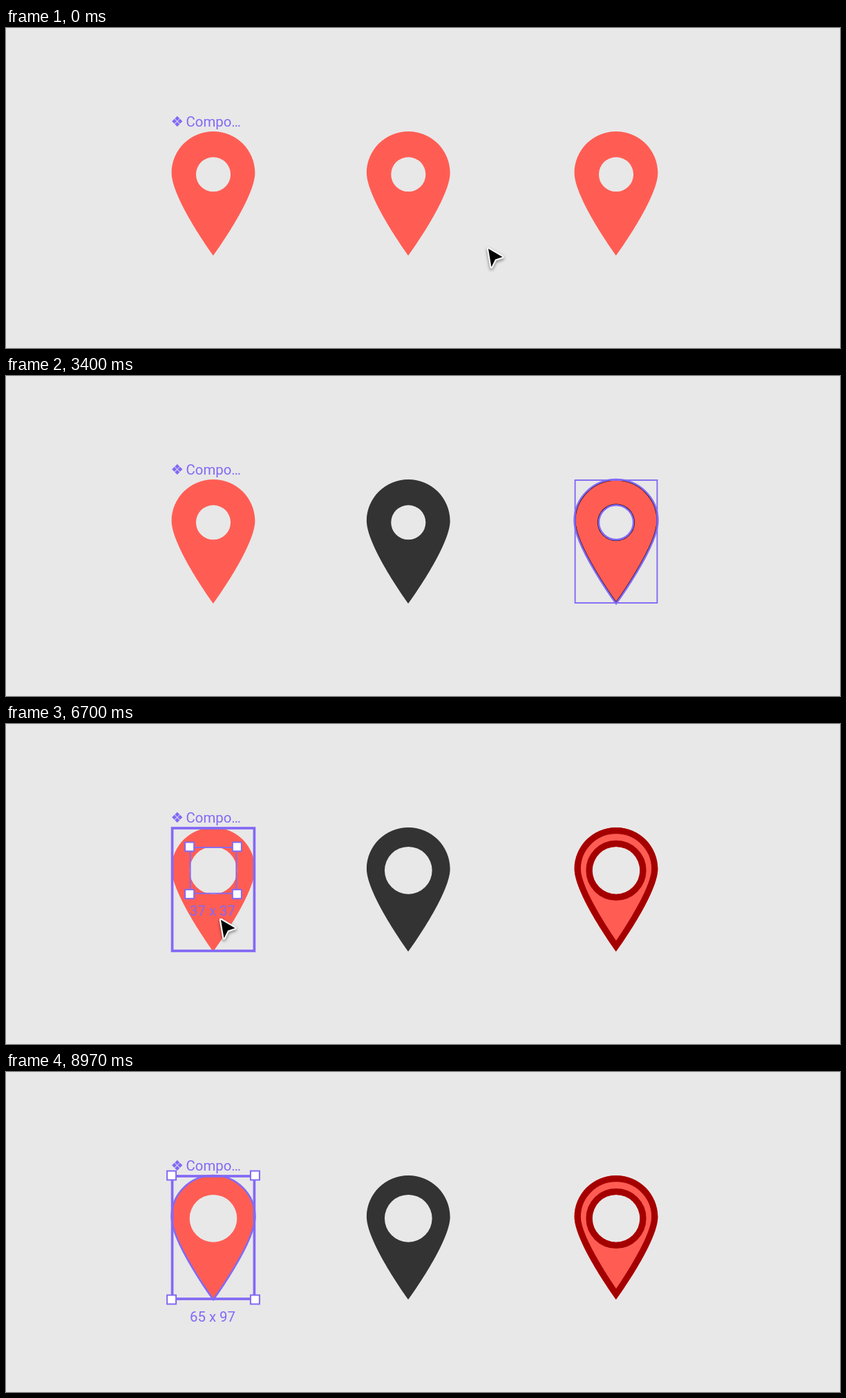
An HTML page with a canvas that plays this animation: 1207 by 464 pixels, repeating every 9.83 s.

```html
<!DOCTYPE html>
<html lang="en">
<head>
<meta charset="utf-8">
<title>Map pin component</title>
<style>
html, body { margin: 0; width: 100%; height: 100%; overflow: hidden; background: #e8e8e8; }
canvas { display: block; }
</style>
</head>
<body>
<canvas width="1207" height="464"></canvas>
<script>
const ctx = document.querySelector('canvas').getContext('2d');
const LOOP = 9830, UNIT = 1.856, TAU = Math.PI * 2;
const BG = '#e8e8e8', RED = '#ff5d54', PURPLE = '#8369f5', MEASURE = '#f03c1e', BLUE = '#2fb4f0';
const MAIN = 300, SECOND = 582.3, THIRD = 883;   // centre x of each pin
const HOLE_Y = 212.3;

// Cursor routes as [ms, x, y]; the cursor is hidden between routes.
const ROUTES = [
  [[0, 698, 320], [30, 698, 320], [210, 612, 290], [270, 612, 290], [450, 945, 245]],
  [[1900, 1050, 215], [2050, 905, 290], [2090, 905, 290], [2170, 981, 249], [2290, 1053, 205]],
  [[4270, 470, 4], [4520, 311, 222], [4850, 311, 222], [4950, 327, 238], [5430, 327, 238],
   [6370, 336.3, 247.3], [6530, 336.3, 247.3], [6700, 311, 284], [7200, 311, 284],
   [7700, 335, 274], [7850, 343, 276], [8030, 342, 289], [8630, 345, 297], [8900, 345, 297]]
];
const BEND = [[7850, 0, 0], [8030, -2, 17], [8630, 1, 25], [8770, 1, 25]];

const within = (t, a, b) => t >= a && t < b;
const ease = (t, a, b) => {
  const p = Math.min(1, Math.max(0, (t - a) / (b - a)));
  return p * p * (3 - 2 * p);
};
const mix = (a, b, p) => a + (b - a) * p;
const mixColor = (a, b, p) => `rgb(${a.map((v, i) => Math.round(mix(v, b[i], p)))})`;

function follow(route, t) {
  for (let i = 1; i < route.length; i++) {
    const [t0, x0, y0] = route[i - 1], [t1, x1, y1] = route[i];
    if (within(t, t0, t1)) {
      const p = ease(t, t0, t1);
      return [mix(x0, x1, p), mix(y0, y1, p)];
    }
  }
  return null;
}

function bodyPath(cx, [bx, by]) {
  const p = new Path2D();
  p.moveTo(cx, 150);
  p.bezierCurveTo(cx + 33.3, 150, cx + 60.4, 176.9, cx + 60.4, 210);
  p.bezierCurveTo(cx + 60.4 + bx, 247 + by, cx + bx, 330 + by, cx, 330);
  p.bezierCurveTo(cx, 330, cx - 60.4, 247, cx - 60.4, 210);
  p.bezierCurveTo(cx - 60.4, 176.9, cx - 33.3, 150, cx, 150);
  p.closePath();
  return p;
}

function pinPath(cx, r, bend) {
  const p = bodyPath(cx, bend);
  p.moveTo(cx + r, HOLE_Y);
  p.arc(cx, HOLE_Y, r, 0, TAU);
  return p;
}

function stroke(color, width, path) {
  ctx.strokeStyle = color;
  ctx.lineWidth = width;
  path ? ctx.stroke(path) : ctx.stroke();
}

function line(color, width, ...points) {
  ctx.beginPath();
  points.forEach(([x, y]) => ctx.lineTo(x, y));
  stroke(color, width);
}

function frame(x, y, w, h, color = PURPLE, width = 1.9) {
  ctx.strokeStyle = color;
  ctx.lineWidth = width;
  ctx.strokeRect(x + 1, y + 1, w - 2, h - 2);
}

function text(str, x, y, color = PURPLE, align = 'center') {
  ctx.font = '20.4px Roboto, sans-serif';
  ctx.textAlign = align;
  ctx.fillStyle = color;
  ctx.fillText(str, x, y);
}

function handles(x, y, w, h, label) {
  for (const hx of [x, x + w]) for (const hy of [y, y + h]) {
    ctx.fillStyle = '#fff';
    ctx.fillRect(hx - 6.5, hy - 6.5, 13, 13);
    ctx.strokeStyle = PURPLE;
    ctx.lineWidth = 2;
    ctx.strokeRect(hx - 6.5, hy - 6.5, 13, 13);
  }
  text(label, x + w / 2 - 1, y + h + 31.7);
}

const pinBox = cx => [cx - 60.4, 150, 120.8, 180];

function select(cx, width) {
  frame(...pinBox(cx), PURPLE, width);
  handles(...pinBox(cx), '65 x 97');
}

function diamond(x, y, r) {
  ctx.beginPath();
  ctx.moveTo(x, y - r);
  ctx.lineTo(x + r, y);
  ctx.lineTo(x, y + r);
  ctx.lineTo(x - r, y);
  ctx.closePath();
}

function title() {
  ctx.fillStyle = PURPLE;
  for (const [dx, dy] of [[0, -4.1], [4.1, 0], [0, 4.1], [-4.1, 0]]) {
    diamond(247.8 + dx, 135.3 + dy, 3.5);
    ctx.fill();
  }
  text('Compo…', 260.5, 142.5, PURPLE, 'left');
}

function insideStroke(path, color, width) {
  ctx.save();
  ctx.clip(path, 'evenodd');
  stroke(color, width * 2, path);
  ctx.restore();
}

function outlined(cx, path) {
  frame(...pinBox(cx));
  stroke(PURPLE, 2.6, path);
}

function measures(r) {
  const x = MAIN, y = HOLE_Y;
  frame(...pinBox(x), MEASURE);
  frame(x - r, y - r, 2 * r, 2 * r, MEASURE);
  line(MEASURE, 1.9, [x, 151], [x, y - r]);
  line(MEASURE, 1.9, [x, y + r], [x, 329]);
  line(MEASURE, 1.9, [x - 60, y], [x - r, y]);
  line(MEASURE, 1.9, [x + r, y], [x + 60, y]);
  text('20', 320, 175, MEASURE);
  text('19', 257, 238.5, MEASURE);
  text('19', 342.5, 238.5, MEASURE);
  text('50', 320.5, 290, MEASURE);
}

function vectorEdit(body, [bx, by], dragging) {
  const right = [360.4, 210], tip = [300, 330];
  const lower = [360.4 + bx, 247 + by], below = [300 + bx, 330 + by];
  stroke('#a3a3a3', 2, body);
  if (dragging) {
    ctx.beginPath();
    ctx.moveTo(...right);
    ctx.bezierCurveTo(...lower, ...below, ...tip);
    stroke('#b5def5', 2.4);
    line('#a3a3a3', 2, [360.4, 177], right, lower);
    line('#a3a3a3', 2, tip, below);
    for (const [x, y] of [[360.4, 177], lower, below]) {
      diamond(x, y, 6);
      ctx.fillStyle = '#fff';
      ctx.fill();
      stroke(BLUE, 2);
    }
  }
  for (const [x, y] of [[300, 150], [239.6, 210], right, tip]) {
    ctx.beginPath();
    ctx.arc(x, y, 6.6, 0, TAU);
    ctx.fillStyle = '#fff';
    ctx.fill();
    stroke(BLUE, 2);
  }
}

// Black shape with a white rim and a soft shadow.
function rimmed(path, rim) {
  ctx.save();
  ctx.lineJoin = ctx.lineCap = 'round';
  ctx.shadowColor = 'rgba(0,0,0,.45)';
  ctx.shadowBlur = 4;
  ctx.shadowOffsetY = 2;
  stroke('#f4f4f4', rim, path);
  ctx.restore();
  ctx.fillStyle = '#000';
  ctx.fill(path);
}

function cursor(x, y, kind) {
  ctx.save();
  ctx.translate(x, y);
  if (kind === 'resize') {
    ctx.rotate(Math.PI / 4);
    rimmed(new Path2D('M-17 0L-8-7V-2H8V-7L17 0L8 7V2H-8V7Z'), 3);
  } else {
    rimmed(new Path2D('M0 0L20.5 12L10 15.5L4.5 26.5Z'), 4.5);
    if (kind === 'bend') {
      const arc = new Path2D('M22 35C22 27 25 24 34 24');
      ctx.lineCap = 'round';
      stroke('#f4f4f4', 8, arc);
      stroke('#222', 3, arc);
      ctx.fillStyle = '#222';
      ctx.beginPath();
      ctx.arc(22.5, 33.5, 3.2, 0, TAU);
      ctx.arc(33, 24.5, 3.2, 0, TAU);
      ctx.fill();
    }
  }
  ctx.restore();
}

function draw(t) {
  ctx.fillStyle = BG;
  ctx.fillRect(0, 0, 1207, 464);

  const size = Math.round(mix(27, 37, ease(t, 5430, 6370)));
  const r = size * UNIT / 2;
  const bend = follow(BEND, t) || [0, 0];
  const [first, second, third] = [MAIN, SECOND, THIRD].map(cx => pinPath(cx, r, bend));
  const body = bodyPath(MAIN, bend);

  for (const [path, color] of [
    [first, RED],
    [second, mixColor([255, 93, 84], [51, 51, 51], ease(t, 900, 1770))],
    [third, RED]
  ]) {
    ctx.fillStyle = color;
    ctx.fill(path, 'evenodd');
  }
  if (t >= 2930) {
    const weight = 1 + Math.round(4 * Math.min(1, Math.max(0, (t - 3430) / 300)));
    insideStroke(third, mixColor([0, 0, 0], [165, 0, 0], ease(t, 4000, 4250)), weight * UNIT);
  }
  title();

  // Second pin: hover, select, recolour
  if (within(t, 180, 240)) stroke(PURPLE, 3, second);
  if (within(t, 240, 470)) select(SECOND);
  if (within(t, 470, 2060)) outlined(SECOND, second);

  // Third pin: select, add and thicken the stroke
  if (within(t, 2060, 2490)) select(THIRD);
  if (within(t, 2490, 4560)) outlined(THIRD, third);

  // Main component: select, resize the hole, select the shape
  if (within(t, 4470, 4850)) frame(...pinBox(MAIN), PURPLE, 3.7);
  if (within(t, 4560, 4850)) handles(...pinBox(MAIN), '65 x 97');
  if (within(t, 6600, 6800)) frame(...pinBox(MAIN), PURPLE, 3.7);
  if (within(t, 4850, 6800)) {
    const box = [MAIN - r, HOLE_Y - r, 2 * r, 2 * r];
    frame(...box);
    handles(...box, `${size} x ${size}`);
  }
  if (within(t, 4960, 5240)) measures(r);
  if (within(t, 6800, 7100) || t >= 8850) {
    stroke(PURPLE, 2.6, body);
    select(MAIN, 3.7);
  }
  if (within(t, 7100, 8850)) vectorEdit(body, bend, within(t, 7850, 8770));

  for (const route of ROUTES) {
    const at = follow(route, t);
    if (at) cursor(...at, within(t, 4930, 6560) ? 'resize' : within(t, 7650, 8850) ? 'bend' : 'arrow');
  }
}

const start = performance.now();
function tick() {
  draw((performance.now() - start) % LOOP);
  requestAnimationFrame(tick);
}
tick();
</script>
</body>
</html>
```
